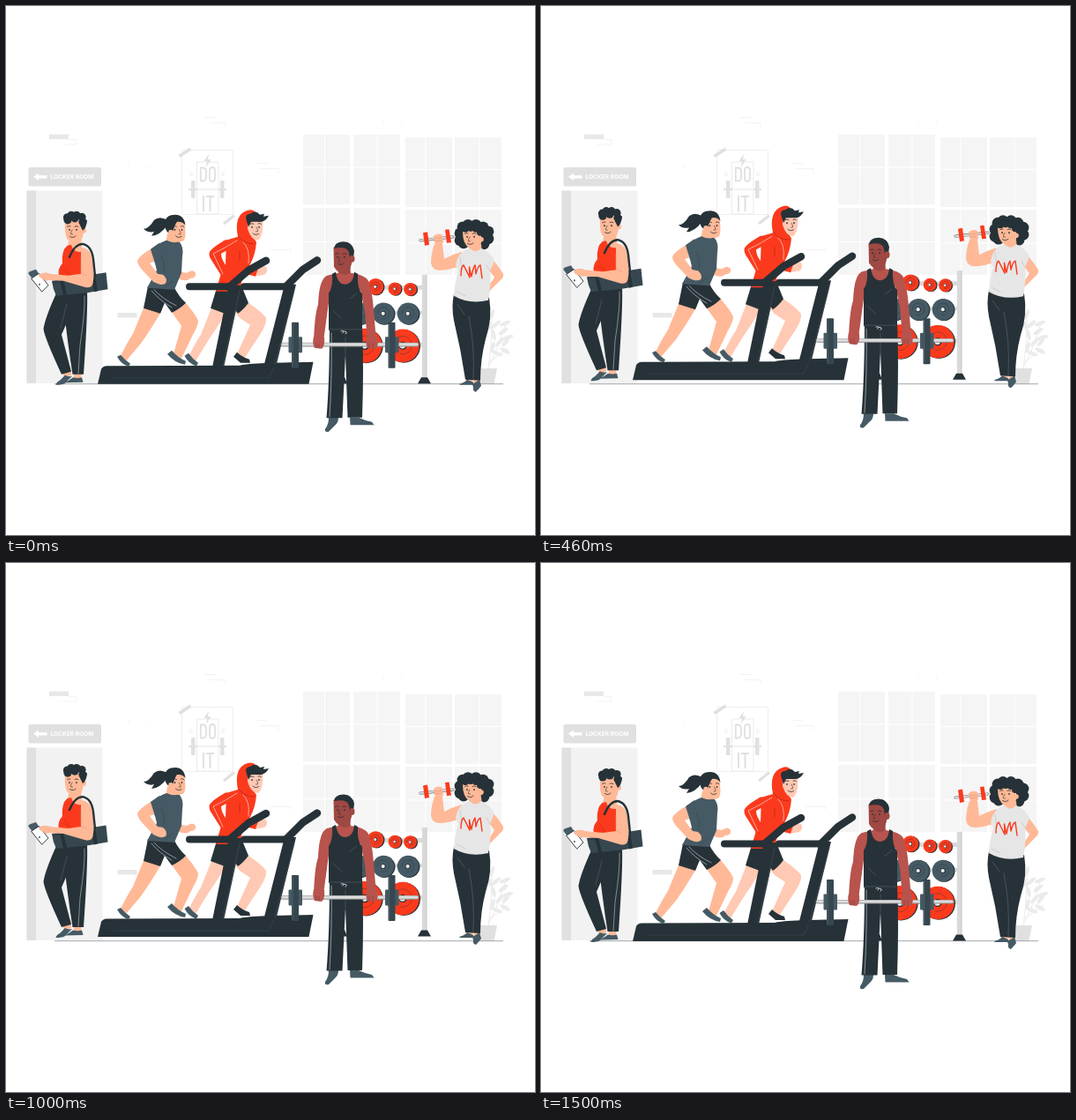
An HTML page with a canvas for the animation above (1.54 s loop, 600 px wide and 600 px high).

```html
<!DOCTYPE html>
<html lang="en">
<head>
<meta charset="utf-8">
<title>Gym</title>
<style>
html, body { margin: 0; width: 100%; height: 100%; overflow: hidden; background: #fff; }
canvas { display: block; width: 100vw; height: 100vh; }
</style>
</head>
<body>
<canvas id="stage" width="600" height="600"></canvas>
<script>
const ctx = document.getElementById('stage').getContext('2d');
const LOOP = 1540, PEAK = 735, RISE = 750, LIFT = 7.6;
const DARK = '#263238', GREY = '#455a64', RED = '#fb3a1d', SKIN = '#ffb997', PALE = '#ffc9b3';
const BROWN = '#a04843', ARM = '#b8534d', STEEL = '#d9d9d9', FAINT = '#ebebeb', MID = '#e0e0e0';

function shape(color, d) {
  ctx.fillStyle = color;
  ctx.fill(new Path2D(d));
}
function line(color, width, d) {
  ctx.strokeStyle = color;
  ctx.lineWidth = width;
  ctx.stroke(new Path2D(d));
}
function box(color, x, y, w, h, r = 0) {
  ctx.fillStyle = color;
  ctx.beginPath();
  ctx.roundRect(x, y, w, h, r);
  ctx.fill();
}
function oval(color, x, y, rx, ry = rx, turn = 0) {
  ctx.fillStyle = color;
  ctx.beginPath();
  ctx.ellipse(x, y, rx, ry, turn, 0, Math.PI * 2);
  ctx.fill();
}
function blobs(color, r, ...points) {
  points.forEach(([x, y]) => oval(color, x, y, r));
}

// Eyes, brows, nose and smile around a nose position; dir is the facing side.
function face(x, y, dir, ink = DARK) {
  ctx.save();
  ctx.translate(x, y);
  ctx.scale(dir, 1);
  oval(ink, -5, -3, 0.8, 1.1);
  oval(ink, 3, -3, 0.8, 1.1);
  line(ink, 0.8, 'M-7-6.5Q-5-8-3-6.7M2-7Q4-8 5.5-6.5');
  line(ink, 0.6, 'M0-3Q2 0 1.5 1.8L-.5 2');
  line(ink, 0.8, 'M-4 4Q-1 7 2.5 4.5');
  ctx.restore();
}

function pane(x, y, h, midX, midY) {
  box('#f5f5f5', x, y, 53, h);
  line('#fff', 1, `M${midX} ${y}v${h}M${x} ${midY}h53`);
}

function poster() {
  ctx.lineJoin = 'miter';
  line(FAINT, 0.8, 'M199.5 163.5H257.5V236.5H199.5Z');
  line(FAINT, 1, 'M216.5 177H241V236H216.5Z');
  line(MID, 3.6, 'M196.5 170.5L209.5 162');
  line(MID, 3.2, 'M247 247L259 237.5');
  shape(MID, 'M230 168L224.5 176H228L227 183L232.5 174H229Z');
  ctx.lineJoin = 'round';
  line(MID, 1.8, 'M220.8 183.5V198.5H223Q227 198.5 227 194V188Q227 183.5 223 183.5Z');
  line(MID, 1.8, 'M231 187Q231 183 234 183T237 187V195Q237 199 234 199T231 195Z');
  line(MID, 2, 'M224 215V233M227 216H236M231.5 216V233');
  box(MID, 207, 207, 10, 2);
  box(MID, 240.5, 207, 9.5, 2);
  box('#f2f2f2', 217, 207, 23.5, 2);
  box(MID, 210, 198, 4.5, 20, 1);
  box(MID, 243, 198, 4.5, 20, 1);
  line(FAINT, 1, 'M208 188l4 2M208 191l4 1M244 190l4-2M244 192l4-1');
}

function plant() {
  line(FAINT, 1, 'M547 412Q552 376 551 346M548 408Q558 390 567 359M548 404L570 388');
  const leaves = [[551, 350, -1.2], [556, 361, -0.7], [566, 360, -0.4], [553, 373, -1.8],
    [564, 369, -0.6], [560, 381, -0.8], [567, 381, -0.9], [566, 391, 0.5],
    [557, 394, 0.4], [552, 387, -1.3], [569, 376, -0.3], [549, 362, 1.2]];
  leaves.forEach(([x, y, a]) => oval(FAINT, x, y, 6.5, 2.3, a));
  shape(MID, 'M535 411H557L553.5 428.5H538Z');
}

function backdrop() {
  ctx.fillStyle = '#fff';
  ctx.fillRect(0, 0, 600, 600);
  box('#e8e8e8', 49, 145.5, 22, 5.5);
  box('#e8e8e8', 126.5, 348, 22, 5.5);
  line('#eee', 0.7, 'M71 151.5H80V157H64M225 126.5H239M231 132.5H249V138M284 178.5H297M288 184.5H309V190M300 276.5H323V280M149 353.5H153');
  line('#f5f5f5', 0.7, 'M427.5 128V135M448.5 128V135M139.5 178V182M162.5 180V184');

  pane(337, 146, 79, 361.5, 183);
  pane(394, 146, 79, 421, 183);
  pane(337, 229, 76, 361.5, 267.5);
  pane(394, 229, 76, 421, 267.5);
  pane(453, 149, 79, 476, 185.5);
  pane(509, 149, 79, 537, 185.5);
  pane(453, 231, 74, 476, 269);
  pane(509, 231, 74, 537, 269);

  box(MID, 25.5, 183, 82.5, 21.5, 2);
  line('#fff', 3.4, 'M35 193.8H46.5');
  shape('#fff', 'M31 193.8L37 189.5V198Z');
  ctx.fillStyle = '#fff';
  ctx.font = '700 6.6px Inter, sans-serif';
  ctx.fillText('LOCKER ROOM', 50.5, 196.3);
  box('#f2f2f2', 23.5, 209.5, 86, 218.5);
  box(MID, 23.5, 209.5, 10.5, 218.5);

  poster();
  plant();
  line('#8b9195', 0.8, 'M55 428.7H564');
}

function lockerWoman() {
  shape(SKIN, 'M63 411L73 409L74 419L66 422ZM77 412H86L85 423H77Z');
  shape(GREY, 'M56.5 430Q57 427 61 425L67 419Q70 421 75 420L67 428Q64 430 56.5 430Z');
  shape(GREY, 'M66 427.5Q70 426 76 421.5Q81 423 86 421.5L87.5 427Z');
  shape(DARK, 'M58 324Q45 352 42.5 366Q43 375 63 418L74 415L63 373Q72 354 78 330Z');
  shape(DARK, 'M60 325H92Q93 345 88 418H75.5Q69 376 66 346Z');
  line('#9aa4a9', 0.8, 'M89 329Q90 345 84 385L82 417');
  line('#56636a', 0.6, 'M69 338L62 365');

  shape(SKIN, 'M72 262H85L86 274Q94 275 97 283L100 310L86 314L84 279L69 278Z');
  shape(RED, 'M69.5 272L74 271Q76 280 85 279L86 308L60 306Q58 299 64 292Q63 284 66 276Z');
  shape('#37474f', 'M52 312L98 305L113.5 302.5L115.5 321.5L92 325.5L57 329Q53 321 52 312Z');
  shape(DARK, 'M97 305L101 304.5L104 323.5L100 324.5ZM61 312L65 311L69 328H65Z');
  line(DARK, 0.7, 'M53 314L97 308');
  shape(SKIN, 'M85 276Q96 276 98 288Q101 302 98.5 315Q97 321 89 319L65 312L46 311Q38 309 38 305Q44 301 50 304L70 306L85 304Z');
  line('#e59272', 0.6, 'M85 286V303L91 306');
  line(DARK, 2.4, 'M72 285Q78 270 87 270Q97 272 99 287L101 306');
  line('#d92b12', 0.6, 'M64 300L74 305M66 295L72 304');

  shape(GREY, 'M25.5 304Q25 302 28 301L34 299L38 305L30 309.5Z');
  shape('#fff', 'M29 309L37.5 303.5L48 317L41 324Z');
  line(DARK, 0.9, 'M29 309L37.5 303.5L48 317L41 324Z');
  oval(GREY, 38, 316, 1);
  shape(SKIN, 'M47 303Q40 302 37 306Q39 310 42 309Q43 313 49 311Z');

  shape(SKIN, 'M67 244H88Q89 263 84 267Q76 272 69 264Q66 257 67 244Z');
  oval(SKIN, 88, 255, 3);
  blobs(DARK, 4.6, [69.5, 240], [74, 237.5], [80, 237.5], [86, 239.5], [87, 245], [78, 241], [70, 243]);
  shape(DARK, 'M84 243L92 243Q91 253 87 255L84 249Z');
  face(75, 257, -1);
}

function runnerMan() {
  shape(PALE, 'M235 338L252 343Q244 359 231 377L215 403L206 400Q216 380 221 373Z');
  shape(PALE, 'M259 347L275 337Q290 347 295 354Q296 361 288 373L271 399L262 395L277 362L265 354Z');
  shape(GREY, 'M202.5 397L207 394Q211 400 218 405L216 408.5Q207 406 202.5 397Z');
  shape(DARK, 'M258 398L262 393Q267 398 276 401L277 405H266Z');
  shape(DARK, 'M239 320H268L275 337Q269 345 263 349L254 337L248 349L232 343Z');
  shape(PALE, 'M283 299Q288 294 295 296Q298 302 293 305L282 307ZM244 301L253 303L257 312L246 311Z');

  shape(RED, 'M246 267L263 262Q258 237 274 232Q280 230 283 234L278 242Q273 253 284 268Q283 282 277 293L269 305L265 324H238L245 300Z');
  shape(RED, 'M250 265Q235 273 231 279Q229 283 234 290L246 309L253 304L246 288Q244 285 256 278Z');
  shape('#fff', 'M244 281L249.5 278L249 294Q244 287 244 281Z');
  shape(RED, 'M267 291L286 298L283 307L264 302Z');
  line('#ffd5cc', 0.7, 'M262 266Q248 275 235 281L246 304M269 268Q277 275 275 292');
  line('#b82611', 0.7, 'M264 261Q269 270 282 270M265 278V288');
  shape(PALE, 'M274 240L291 238Q293 260 286 266Q278 266 274 253Z');
  shape(DARK, 'M272 241Q272 236 277 236Q283 231 288 237L293 236L292 239L298 238Q294 246 286 245L278 245L275 251Z');
  face(284, 254, 1);
}

function treadmill() {
  shape(DARK, 'M114 408.5L265 408Q272 405 348.5 404L343.5 429H104L108 412Q110 408.5 114 408.5Z');
  line('#3c494f', 0.6, 'M122 422H298L304 409');
  shape(DARK, 'M253 317H267L247 410H234ZM316 316H329L306 410H292Z');
  line(DARK, 8, 'M208 318.5H258M270 318.5H320');
  line(DARK, 8.5, 'M253 319L275 300L295 289M317 319L337 299L353 288.5');
  line('#44525a', 0.6, 'M265 323L246 408M327 323L305 407');
}

function runnerWoman() {
  shape(SKIN, 'M158 338L177 345Q167 363 153 383L136 403L129 399Q138 381 144 372Z');
  shape(SKIN, 'M187 346L203 336Q215 350 218 357Q218 363 212 373L199 400L190 395L199 363Z');
  shape(GREY, 'M126 398L130 396Q135 402 141 406L139 409Q131 407 126 398Z');
  shape(GREY, 'M183 395L188 391Q195 399 204 403L203 407Q191 405 183 395Z');
  shape(DARK, 'M161 318H190Q196 330 204 337Q197 344 188 348L180 337L175 349L156 343Z');
  line('#b8c0c4', 0.7, 'M165 323Q173 333 188 342M168 322Q177 332 193 340');
  shape(SKIN, 'M193 301L205 303Q212 298 215 303Q216 309 209 309Q205 314 194 309Z');
  shape(SKIN, 'M183 258L194 264L194 271H181Z');
  shape(GREY, 'M165 276Q175 268 182 266Q191 270 196 267Q202 273 200 284L199 303L191 322L160 320L171 300Z');
  shape(SKIN, 'M164 276Q154 282 150 287Q147 290 153 298L167 313Q176 318 181 315Q184 310 178 305L172 304L163 292L173 288Z');
  shape(GREY, 'M164 276L174 269L177 287L169 292Z');
  line('#33454d', 0.6, 'M176 283Q181 294 179 302M189 312L180 319');
  shape(DARK, 'M183 243Q174 238 168 243Q162 253 156 253Q161 258 168 256L165 261Q174 261 183 249Z');
  shape(SKIN, 'M183 246L202 244Q205 260 202 266Q194 271 186 263Z');
  shape(DARK, 'M180 250Q179 237 192 237Q202 237 203.5 249Q200 244 194 245Q191 249 189 257Q183 261 180 250Z');
  oval(SKIN, 187, 257, 2.8, 3.2);
  face(196.5, 257, 1);
}

function plate(x, y, r, color) {
  oval(DARK, x + 1.2, y + 0.5, r);
  oval(color, x, y, r);
  ctx.globalAlpha = 0.55;
  line(DARK, 0.7, `M${x - r * 0.55} ${y}a${r * 0.55} ${r * 0.55} 0 1 1 ${r * 0.4} ${r * 0.5}`);
  ctx.globalAlpha = 1;
  oval(DARK, x, y, r * 0.24);
  oval('#eee', x - 0.3, y, r * 0.17);
}

function rack() {
  box(STEEL, 398, 317, 76, 5);
  box(STEEL, 398, 346, 76, 4);
  box(STEEL, 398, 382, 76, 5);
  box(STEEL, 471.8, 305, 5.4, 117);
  line('#bdbdbd', 0.7, 'M477 305V422');
  shape(DARK, 'M467 428.5L471 421.5H478L482 428.5ZM378 428.5L380 421H384L387 428.5Z');
  plate(419, 318.5, 9.3, RED);
  plate(441, 321, 7.4, RED);
  plate(458.5, 321.5, 7.4, RED);
  plate(401, 349, 12.5, GREY);
  plate(428, 349, 12.3, GREY);
  plate(456, 349, 12.3, GREY);
  plate(407, 385.5, 19.5, RED);
  plate(450, 385.5, 18.8, RED);
}

function barbell() {
  line('#8f8f8f', 4.6, 'M314 384.3H466');
  line('#dcdcdc', 3.2, 'M314 384H466');
  for (const x of [324, 433.5]) {
    box(GREY, x - 3.5, 375.5, 15.5, 18, 1);
    box('#37474f', x, 359, 8, 52, 1);
    line('#5c6d75', 0.7, `M${x + 1} 361V409`);
  }
}

function lifter() {
  shape(GREY, 'M366 467H377Q377 473 373 476L366 483Q361 484 362 480Q366 475 366 467Z');
  shape(GREY, 'M390 467H400Q408 471 415 472L417.5 475.5H390.5Z');
  shape(DARK, 'M367 364H404Q406 410 404 467H387.5L385 396L381.5 467.5H363.5Q367 425 367 364Z');
  line('#a8b1b5', 0.8, 'M369 371Q370 420 367 466');
  line('#56636a', 0.6, 'M385 376V396');
  shape(ARM, 'M377 296H390L391 303Q407 305 411 312Q415 321 417 345L420 381H410L407 347L402 323H368L365 344L360 381H349Q350 350 354 339Q355 310 364 306L377 303Z');
  shape(DARK, 'M370 304L374 302Q376 316 385 316Q394 315 395 302L399 304Q398 321 404 327V367L366 368V326Q371 319 370 304Z');
  line('#56636a', 0.6, 'M367 367H403M390 332L398 326M371 346L380 354');
  line('#e0e0e0', 0.9, 'M380 369Q384 367 382 371M383 369Q389 370 385 372');
  shape(BROWN, 'M376 294H391L390 303Q384 308 377 302Z');
  shape(BROWN, 'M371.5 274Q382 268 393 277Q394 297 386 303Q377 305 372 296Z');
  shape(DARK, 'M372 275Q373 267.5 383 267.5Q393 268 395 278L393.5 290H390.5L389 280Q387 272 372 275Z');
  oval(BROWN, 392.5, 287, 3, 4);
  face(379, 288, -1);
}

function lifterHands() {
  shape(ARM, 'M349 375L361 376Q362 386 358 389L350 388Q347 383 349 375Z');
  shape(ARM, 'M409 376L421 375Q423 384 420 389H411Q407 385 409 376Z');
  line('#813a36', 0.6, 'M352 383V388M355 383V388M412 383V388M416 383V388');
}

function curlWoman() {
  blobs(DARK, 6.4, [518, 251], [524, 248.5], [533, 248.5], [541, 251], [547, 256], [547, 264],
    [542, 270], [515, 258], [515, 266], [519, 269], [536, 256], [527, 254], [540, 262]);
  shape(SKIN, 'M521 421H530L529 429H523ZM530 421H538L537 430H531Z');
  shape(GREY, 'M514 429Q521 427 523 424L530 427L531 430H515Z');
  shape(GREY, 'M529 429Q533 427 537 424L539 431Q537 434 533 438Q529 437 530 433Z');
  shape(DARK, 'M508 327Q505 341 508 357Q516 390 521 424L538 425Q538 401 544 378Q552 355 548 331Z');
  line('#56636a', 0.7, 'M525 352Q532 387 530 423M512 339L520 350');

  shape(SKIN, 'M517 279Q506 282 497 287L495 270L486 270Q482 281 482 292Q484 300 491 300Q503 300 515 295Z');
  shape(SKIN, 'M551 287Q557 293 564 304Q565 308 560 312L547 325Q540 327 536 322Q534 318 540 317L548 317L554 308L548 300Z');
  shape(SKIN, 'M525 270H539L540 281Q531 285 525 279Z');
  shape('#e6e6e6', 'M519 278L526 275Q532 282 539 275Q549 279 554 289L549 301Q551 313 547 334Q525 339 508 329Q509 312 513 301L510 294Q512 283 519 278Z');
  line('#bdbdbd', 0.6, 'M515 285L517 300M549 301L545 294M511 324L521 329');
  line(RED, 1.4, 'M516 306Q516 296 519 294Q522 300 526 308L525.5 296Q527 304 528 307Q530 296 532 294L533 304Q535 295 538 294L540 309');

  shape(SKIN, 'M518 256Q526 252 539 256L539 269Q534 277 526 275Q518 271 518 256Z');
  oval(SKIN, 539, 265, 2.8);
  blobs(DARK, 4, [521, 253], [527, 252], [533, 253], [538, 257]);
  face(526, 265, -1);

  line('#777', 3.2, 'M470 266L507 262');
  line('#dcdcdc', 2, 'M470 266L507 262');
  shape(RED, 'M473 257.5L478 256.5L480 271L475 272ZM498 254L502.5 253.5L505 268.5L500 269Z');
  shape(SKIN, 'M485 261Q490 257 495 260L496 268Q494 272 487 271Z');
  line('#e59272', 0.6, 'M486 264L494 263M486 267L494 266');
}

function draw(now) {
  const t = now % LOOP;
  const lift = LIFT * Math.max(0, 1 - Math.abs(t - PEAK) / RISE);
  ctx.lineCap = 'butt';
  backdrop();
  ctx.save();
  ctx.translate(0, -lift);
  ctx.lineCap = ctx.lineJoin = 'round';
  [lockerWoman, runnerMan, treadmill, runnerWoman, rack, lifter, barbell, lifterHands, curlWoman]
    .forEach(part => part());
  ctx.restore();
}

let start;
function tick(now) {
  start ??= now;
  draw(now - start);
  requestAnimationFrame(tick);
}
draw(0);
requestAnimationFrame(tick);
</script>
</body>
</html>
```
